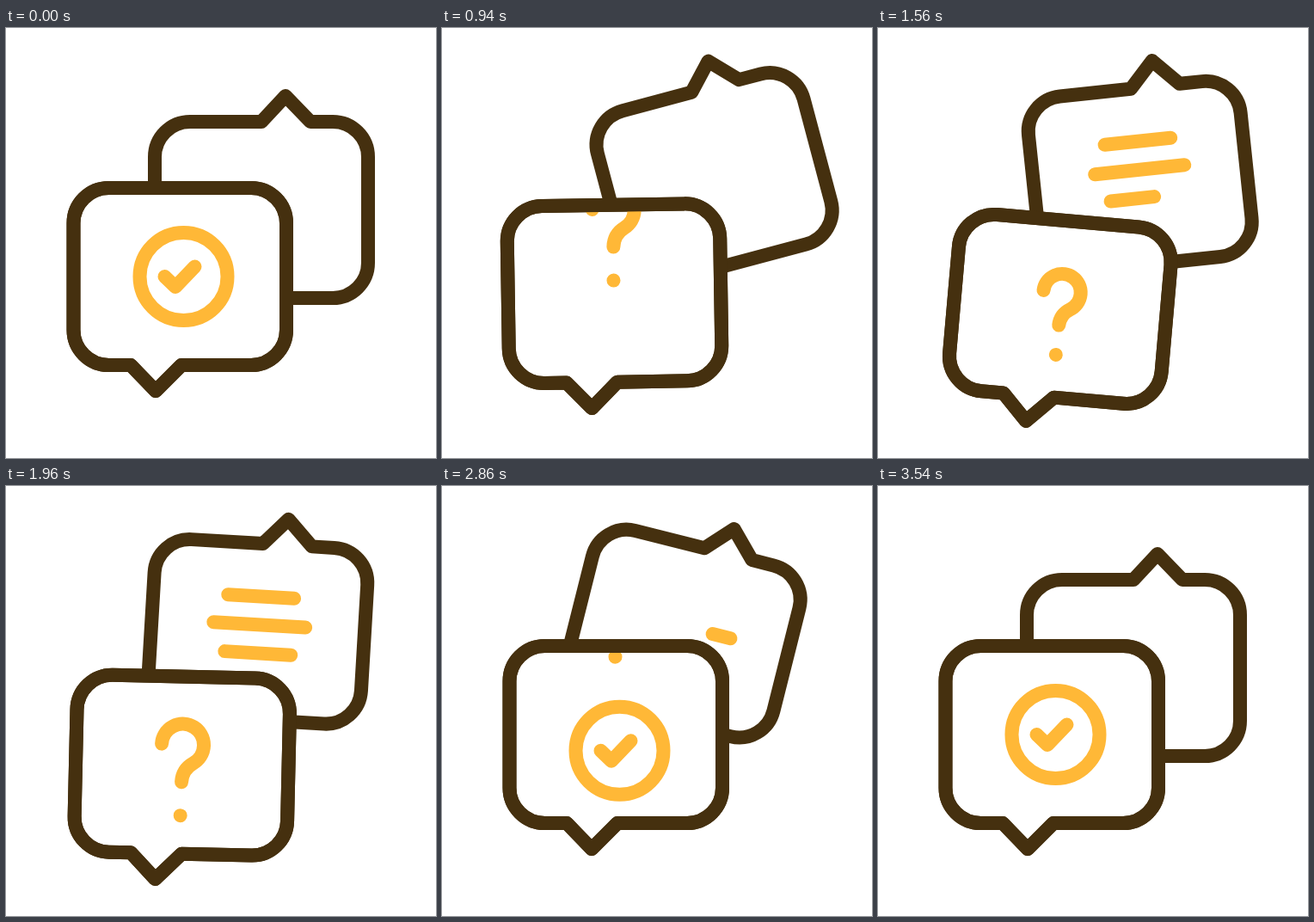
Write an HTML page that moves like this. It is 500 px wide and 500 px high and loops after 3.6 s.

```html
<!DOCTYPE html>
<html lang="en">
<head>
<meta charset="utf-8">
<title>Chat bubbles</title>
<style>
  html, body { margin: 0; width: 100%; height: 100%; overflow: hidden; background: #fff; }
  svg { display: block; width: 100vw; height: 100vh; }
  path, line, circle { stroke-width: 16; stroke-linecap: round; stroke-linejoin: round; }
  .bubble { fill: #fff; stroke: #45300f; }
  .mark { fill: none; stroke: #ffb837; }
  .mark * { vector-effect: non-scaling-stroke; }
</style>
</head>
<body>
<svg viewBox="0 0 500 500">
  <defs>
    <path id="shape" d="M119.5 186H285a41 41 0 0 1 41 41V351a41 41 0 0 1-41 41H204L174 422L145 392H119.5a41 41 0 0 1-41-41V227a41 41 0 0 1 41-41Z"/>
    <clipPath id="inside"><use href="#shape"/></clipPath>
  </defs>
  <g id="back">
    <path class="bubble" d="M214 109H297L325 79L354 109H380a41 41 0 0 1 41 41V273a41 41 0 0 1-41 41H214a41 41 0 0 1-41-41V150a41 41 0 0 1 41-41Z"/>
    <g id="lines" class="mark"><line/><line/><line/></g>
  </g>
  <g id="front">
    <use href="#shape" class="bubble"/>
    <g clip-path="url(#inside)">
      <g id="check" class="mark">
        <circle cx="206.5" cy="289" r="51"/>
        <path d="M184.5 289L197 301L219.5 277.5"/>
      </g>
      <g id="question" class="mark">
        <path d="M178 264.5A24.5 24.5 0 1 1 215 286.5Q202.5 294 202 308.5M201.5 347.5h.01"/>
      </g>
    </g>
    <use href="#shape" class="bubble" style="fill:none"/>
  </g>
</svg>
<script>
const LOOP = 3600;
const $ = id => document.getElementById(id);
const smooth = p => p * p * (3 - 2 * p);
const mix = (a, b, p) => a + (b - a) * p;

// Eases from one [time, value] pose to the next.
const ease = (...poses) => t => {
  const i = poses.findIndex(([time]) => time > t);
  if (i < 1) return poses.at(i)[1];
  const [t0, v0] = poses[i - 1], [t1, v1] = poses[i];
  return mix(v0, v1, smooth((t - t0) / (t1 - t0)));
};

const backTurn = ease([130, 0], [750, -15], [880, -15], [2740, 14.6], [2800, 14.6], [3360, 0]);
const backY = ease([130, 0], [750, -42.5], [2645, -39.5], [3360, 0]);
const frontTurn = ease([130, 0], [740, -7], [1180, 7], [2260, 0]);
const frontY = ease([120, 0], [470, -21.5], [1180, 35], [2330, 35], [2820, 0]);
const checkY = ease([320, 0], [880, 200], [2480, 200], [2950, 0]);
const questionY = ease([610, -180], [1200, 0], [2420, 0], [3020, -180]);
const bob = ease([0, 1], [350, 0.885], [540, 1.03], [700, 1]);
const lineIn = ease([1160, 0], [1490, 1]);
const lineOut = ease([2526, 0], [2856, 1]);

const swing = (id, y, turn, px, py) =>
  $(id).setAttribute("transform", `translate(0 ${y}) rotate(${turn} ${px} ${py})`);

const slide = (id, y, size, cx, cy) =>
  $(id).setAttribute("transform", `translate(${cx} ${cy + y}) scale(${size}) translate(${-cx} ${-cy})`);

function drawLine(line, i, t) {
  const half = i === 1 ? 53.5 : 38.5;
  const from = lineOut(t - i * 100), to = lineIn(t - i * 100);
  const at = p => 298.5 + mix(-half, half, p);
  const attrs = { x1: at(from), x2: at(to), y1: 170.5 + i * 33, y2: 170.5 + i * 33 };
  for (const name in attrs) line.setAttribute(name, attrs[name]);
  line.style.display = to > from ? "" : "none";
}

function draw(t) {
  swing("back", backY(t), backTurn(t), 325, 139);
  swing("front", frontY(t), frontTurn(t), 174, 400);
  slide("check", checkY(t), bob(t - 2850), 206.5, 289);
  slide("question", questionY(t), bob(t - 1210), 205, 302);
  [...$("lines").children].forEach((line, i) => drawLine(line, i, t));
}

const start = performance.now();
function tick() {
  draw((performance.now() - start) % LOOP);
  requestAnimationFrame(tick);
}
tick();
</script>
</body>
</html>
```
